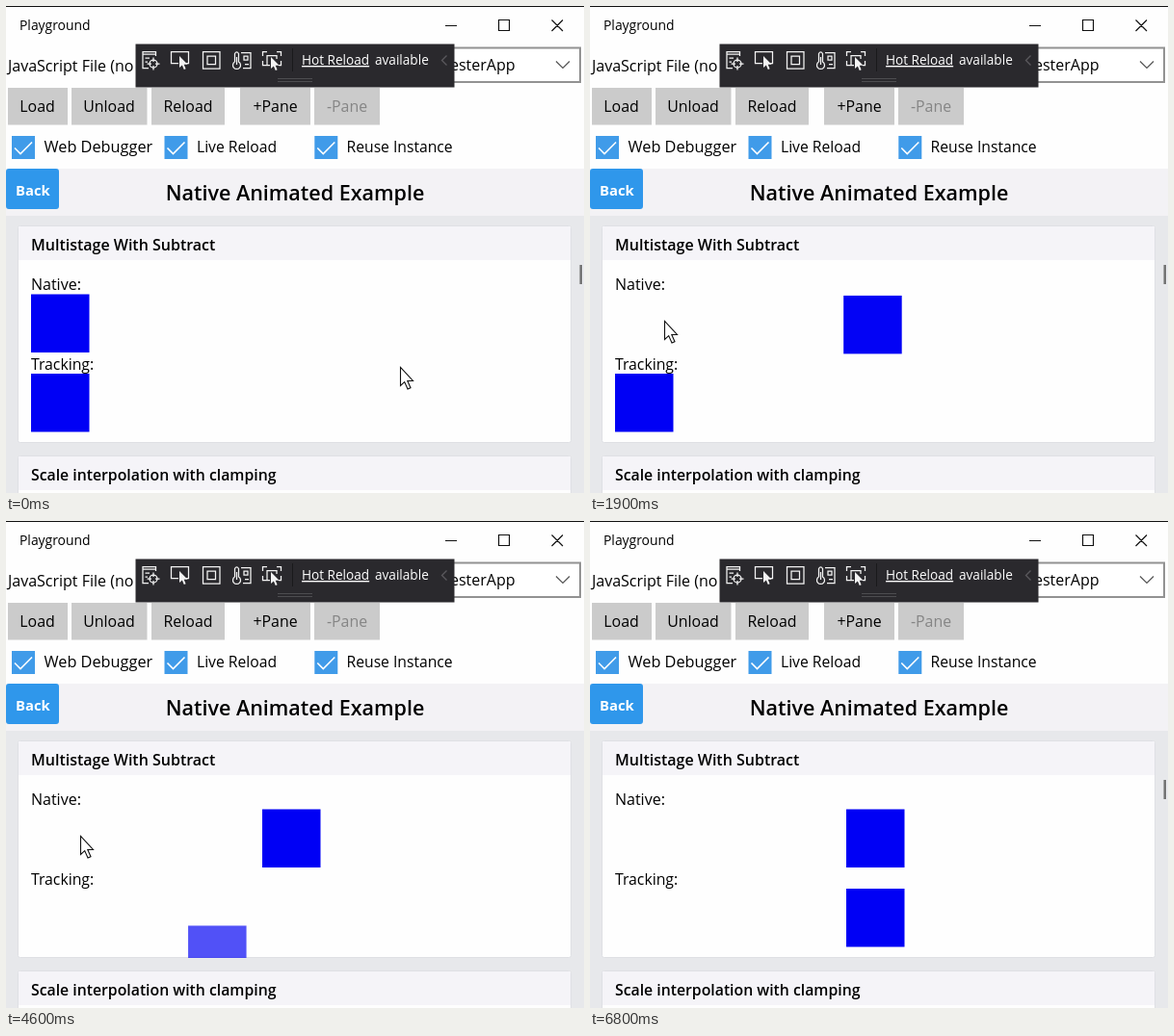
An HTML page for the animation above (6900 ms loop, 600 by 506 pixels).

```html
<!DOCTYPE html>
<html lang="en">
<head>
<meta charset="utf-8">
<title>Native Animated Example</title>
<style>
  html, body { margin: 0; width: 100%; height: 100%; overflow: hidden; background: #fefefe; }
  svg { display: block; width: 600px; height: 506px; }
  text { font: 16px "Open Sans", "Noto Sans", sans-serif; fill: #000; }
  .strong { font-weight: 600; font-size: 16px; }
  .button { font-size: 15.9px; text-anchor: middle; }
  .small { font-size: 13.6px; fill: #fff; }
  .line { fill: none; stroke: #111; stroke-width: 1.2; }
  .icons { fill: none; stroke: #f4f4f4; stroke-width: 1.25; }
  .block { fill: #0000f5; }
</style>
</head>
<body>
<svg viewBox="0 0 600 506">
  <defs>
    <clipPath id="card"><rect x="13" y="229" width="574" height="225"/></clipPath>
    <path id="pointer" d="M0 0V12L2.9 9.5L4.8 14L6.6 13.2L4.7 8.8H8.6Z"/>
    <g id="check">
      <rect width="24" height="24" fill="#409be9"/>
      <path d="M3 12.5L9 18.5L21 6.5" fill="none" stroke="#fff" stroke-width="1.6"/>
    </g>
  </defs>
  <rect width="600" height="506" fill="#fefefe"/>

  <!-- Title bar -->
  <path d="M0 .5H600" class="line"/>
  <text x="14" y="25" style="font-size:13.9px">Playground</text>
  <path d="M456 20.5H468M511.5 14.5H522.5V25.5H511.5ZM566.5 14.5L578 26M578 14.5L566.5 26" class="line"/>

  <!-- File row -->
  <text x="2" y="68">JavaScript File (no</text>
  <rect x="400" y="43.5" width="196" height="35.5" fill="#fff" stroke="#929292" stroke-width="2"/>
  <text x="528.5" y="67" text-anchor="end">TesterApp</text>
  <path d="M571 57.5L578 64.5L585 57.5" class="line" style="stroke:#555"/>

  <!-- Buttons -->
  <g fill="#cbcbcb">
    <rect x="2" y="85" width="62" height="38.5"/>
    <rect x="68" y="85" width="78.5" height="38.5"/>
    <rect x="151" y="85" width="76" height="38.5"/>
    <rect x="243" y="85" width="73" height="38.5"/>
    <rect x="320" y="85" width="68" height="38.5"/>
  </g>
  <g>
    <text x="32.5" y="110" class="button">Load</text>
    <text x="107" y="110" class="button">Unload</text>
    <text x="189" y="110" class="button">Reload</text>
    <text x="279.5" y="110" class="button">+Pane</text>
    <text x="354" y="110" class="button" style="fill:#858585">-Pane</text>
  </g>

  <!-- Check boxes -->
  <use href="#check" x="6" y="135"/>
  <use href="#check" x="164.5" y="135"/>
  <use href="#check" x="320.3" y="135"/>
  <text x="39.5" y="152" style="font-size:16.3px">Web Debugger</text>
  <text x="198" y="152" style="font-size:15.7px">Live Reload</text>
  <text x="353.5" y="152" style="font-size:15.7px">Reuse Instance</text>

  <!-- Debug toolbar -->
  <rect x="134.5" y="39.5" width="331" height="45" fill="#2a292d"/>
  <path d="M297.5 44V68" stroke="#19191b"/>
  <path d="M282 75.5H318M282 78.5H318" stroke="#4d4d50"/>
  <path d="M457.5 51.5L452.5 56.5L457.5 61.5" fill="none" stroke="#5a595d" stroke-width="1.3"/>
  <g class="icons">
    <path d="M148 64.5H142V47.5H155.5V52M142 50H155.5M144.5 54H149M144.5 58H147"/>
    <circle cx="153" cy="60" r="4"/>
    <path d="M153 53.5V58M153 62V66.5M146.5 60H151M155 60H159.5"/>
    <path d="M179 59.5H171.5V47.5H189.5V59.5H187"/>
    <path d="M204.5 47.5H222V65H204.5ZM209 52H217.5V60.5H209Z"/>
    <path d="M237.5 58V49.5Q239.5 46 241.5 49.5V58A4 4 0 1 1 237.5 58M239.5 53V61"/>
    <path d="M244 48.5H254V64.5H246M247 52H251V56H247ZM248 60.5H252"/>
    <path d="M266.5 52V47.5H271M281 47.5H285.5V52M266.5 57V61.5H271M285.5 57V61.5H283M274 61.5H271V51.5H281V55"/>
    <g fill="#f4f4f4" stroke="none">
      <use href="#pointer" x="180" y="52"/>
      <use href="#pointer" x="275" y="53"/>
    </g>
  </g>
  <text x="307" y="61" class="small" text-decoration="underline">Hot Reload</text>
  <text x="383" y="61" class="small">available</text>

  <!-- Page header -->
  <rect y="169" width="600" height="49" fill="#f3f2f5"/>
  <rect y="169" width="55" height="42" rx="3" fill="#2f97eb"/>
  <text x="10" y="197" class="strong" style="fill:#fff;font-weight:700;font-size:14.8px">Back</text>
  <text x="300" y="202" class="strong" text-anchor="middle" style="font-size:21.5px">Native Animated Example</text>

  <!-- Cards -->
  <rect y="218" width="600" height="288" fill="#e7e8eb"/>
  <g stroke="#dfe0e4">
    <rect x="12.5" y="228.5" width="574" height="225" rx="2" fill="#fefefe"/>
    <rect x="12.5" y="467.5" width="574" height="60" rx="2" fill="#fefefe"/>
  </g>
  <path d="M13 229H586V264H13ZM13 468H586V503H13Z" fill="#f5f4f8"/>
  <text x="26" y="254" class="strong">Multistage With Subtract</text>
  <text x="26" y="493" class="strong" style="font-size:15.8px">Scale interpolation with clamping</text>

  <g clip-path="url(#card)">
    <text x="26" y="295">Native:</text>
    <rect id="native" class="block" x="26" y="299.5" width="60.5" height="60.5"/>
    <text x="26" y="378" style="font-size:15.8px">Tracking:</text>
    <rect id="tracking" class="block" x="26" y="382" width="60.5" height="60.5"/>
  </g>

  <rect id="scrollbar" x="595.5" y="269" width="2.5" height="20" fill="#737373"/>
  <path id="cursor" d="M.5 .5V19.5L4.7 15.6L8 23L11 21.7L7.8 14.5H13.5Z" fill="#fff" stroke="#111" stroke-width="1.1"/>
</svg>
<script>
  const LOOP = 6900, FRAME = 100;
  const part = id => document.getElementById(id);
  const [native, tracking, scrollbar, cursor] =
    ["native", "tracking", "scrollbar", "cursor"].map(part);

  const clamp = v => Math.min(1, Math.max(0, v));
  const show = (el, on) => el.setAttribute("visibility", on ? "visible" : "hidden");

  // cubic-bezier(.42, 0, 1, 1), solved by bisection
  function easeIn(x) {
    let lo = 0, hi = 1;
    for (let i = 0; i < 24; i++) {
      const s = (lo + hi) / 2, r = 1 - s;
      if (1.26 * s * r * r + 3 * s * s * r + s ** 3 < x) lo = s; else hi = s;
    }
    return lo * lo * (3 - 2 * lo);
  }
  const easeInOut = u => u < .5 ? easeIn(2 * u) / 2 : 1 - easeIn(2 - 2 * u) / 2;
  const progress = (t, start, length) => easeInOut(clamp((t - start) / length));

  // Slides right while dipping and fading towards the middle
  function moveBlock(el, p) {
    const dip = 1 - Math.abs(2 * p - 1);
    el.setAttribute("transform", `translate(${240 * p} ${60 * dip})`);
    el.setAttribute("opacity", 1 - dip / 2);
  }

  function draw(t) {
    moveBlock(native, progress(t, 978, 980));
    moveBlock(tracking, progress(t, 3982, 1000));

    const c = progress(t, 50, 700);
    cursor.setAttribute("transform", `translate(${409 - 332 * c} ${375 - 48 * c})`);
    show(cursor, t < 6000);
    show(scrollbar, t < 2900 || t >= 5900);
  }

  const begin = performance.now();
  function tick() {
    const t = (performance.now() - begin) % LOOP;
    draw(Math.floor(t / FRAME) * FRAME);
    requestAnimationFrame(tick);
  }
  tick();
</script>
</body>
</html>
```
